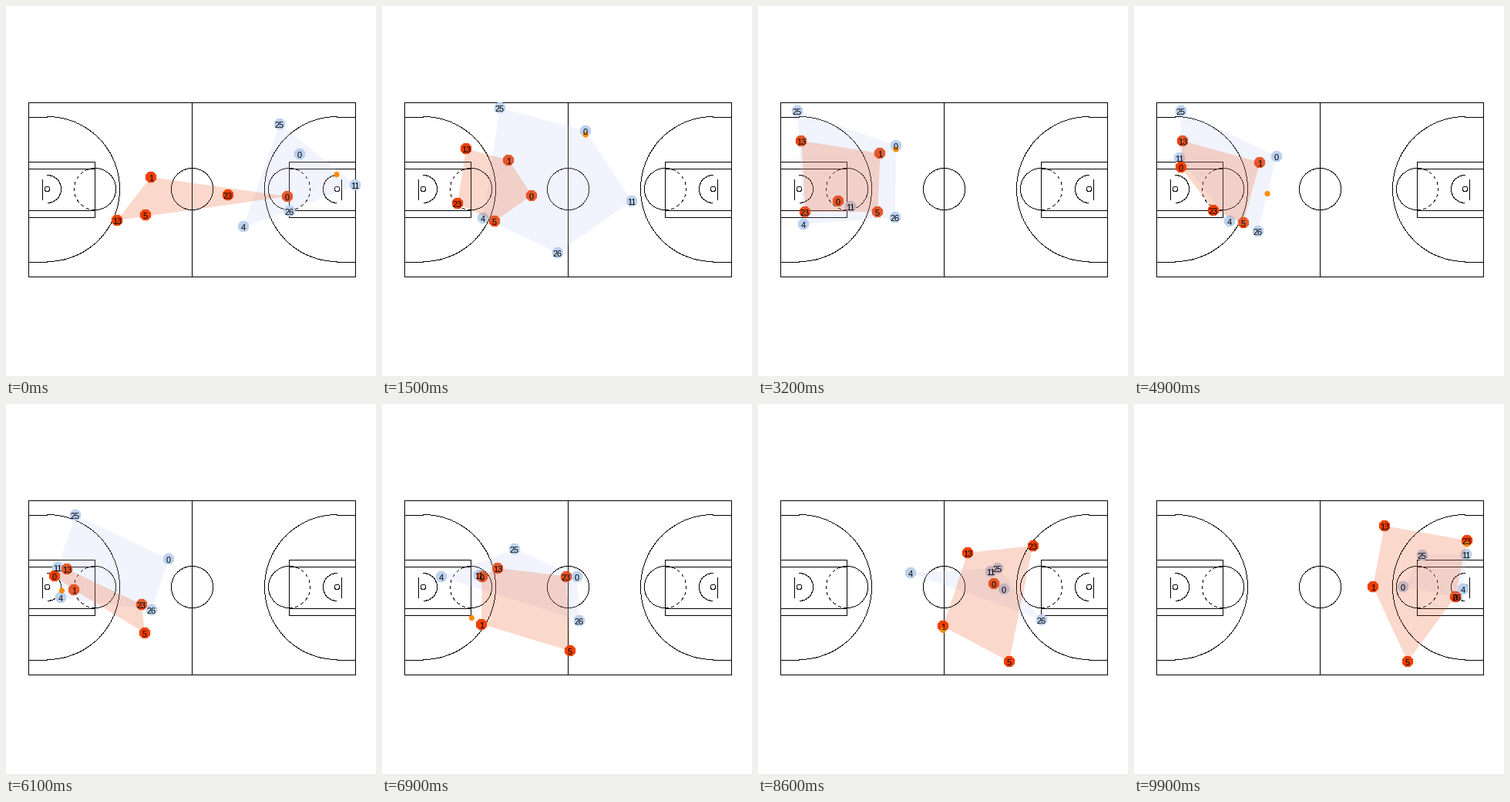
These frames come from a looping animation (480x480 px, 10 s). A matplotlib script:

```python
import numpy as np
import matplotlib.pyplot as plt
from matplotlib.animation import FuncAnimation
from matplotlib.patches import Circle, Polygon, RegularPolygon

SIZE, DPI, FRAMES = 480, 100, 100
PX = 72 / DPI
BLUE, ORANGE, BALL = "#bcd2ee", "#ee4000", "#ff8c00"
BLUE_AREA = "#bacbf4"
FT = 4.51                                   # pixels per foot
CX, CY = 241, 238
PAINT, RIM, FAR_RIM = map(np.array, ((65, CY), (53, CY), (429, CY)))
START, RETREAT, SET, SWING, SHOT, BREAK, END = 0, 15, 32, 49, 61, 76, 99


def mix(a, b, u):
    return np.asarray(a) * (1 - u) + np.asarray(b) * u


def glide(keys):
    """Monotone cubic path through {time: (x, y)}, one point per frame."""
    t = np.array(sorted(keys), float)
    p = np.array([keys[k] for k in sorted(keys)], float)
    h = np.diff(t)[:, None]
    d = np.diff(p, axis=0) / h
    same = d[:-1] * d[1:] > 0
    inner = np.where(same, 2 * d[:-1] * d[1:] / np.where(same, d[:-1] + d[1:], 1), 0)
    m = np.vstack([d[:1], inner, d[-1:]])
    f = np.arange(FRAMES)
    k = np.clip(np.searchsorted(t, f, side="right") - 1, 0, len(h) - 1)
    u = (f - t[k])[:, None] / h[k]
    return (mix(p[k], p[k + 1], u * u * (3 - 2 * u))
            + h[k] * u * (1 - u) * ((1 - u) * m[k] - u * m[k + 1]))


blue, orange = {}, {}


def matchup(man, guard, gap, attack, counter):
    """The guard drops back, then stays a share `gap` of the way to the paint."""
    runs = dict(zip((START, RETREAT, SET, SWING, SHOT, BREAK), attack))
    marks = dict(zip((START, SHOT, BREAK, END), counter))
    for t, share in ((RETREAT, 0.5), (SET, gap), (SWING, gap)):
        marks[t] = mix(runs[t], PAINT, share)
    blue[man], orange[guard] = runs, marks


matchup("25", "13", 0.38,
        [(355, 153), (153, 132), (51, 136), (61, 136), (90, 144), (253, 220)],
        [(144, 278), (79, 214), (222, 210), (325, 158)])
matchup("0", "1", 0.18,
        [(381, 192), (264, 162), (179, 181), (185, 195), (211, 201), (290, 241)],
        [(188, 222), (88, 241), (184, 310), (310, 237)])
matchup("11", "0", 0.3,
        [(453, 232), (324, 253), (120, 260), (59, 197), (67, 212), (205, 226)],
        [(365, 247), (63, 223), (217, 225), (417, 250)])
matchup("26", "5", 0.2,
        [(368, 266), (228, 320), (178, 274), (161, 292), (189, 267), (320, 292)],
        [(181, 271), (180, 297), (296, 334), (355, 334)])
matchup("4", "23", 0.35,
        [(308, 286), (131, 275), (59, 283), (124, 279), (71, 251), (91, 210)],
        [(288, 245), (176, 260), (294, 192), (432, 177)])

# On the counter-attack blue marks orange in the same way
for man, rival, share in (("25", "13", 0.47), ("0", "1", 0.33), ("11", "23", 0.3),
                          ("26", "5", 0.87), ("4", "0", 0.8)):
    blue[man][END] = mix(orange[rival][END], FAR_RIM, share)

blue = {num: glide(keys) for num, keys in blue.items()}
orange = {num: glide(keys) for num, keys in orange.items()}

# Who has the ball, and from when until when; it flies straight in between
hoop = np.tile(RIM, (FRAMES, 1))
HOLDS = [(blue["11"], -9, -2), (blue["0"], 4, 47), (blue["26"], 51, 55),
         (hoop, 62, 64), (orange["1"], 70, 90), (orange["23"], 96, FRAMES)]


def ball_at(f):
    for (who, _, end), (taker, start, _) in zip(HOLDS, HOLDS[1:]):
        if end < f < start:
            return mix(who[f], taker[f], (f - end) / (start - end))
    holder = next(who for who, start, end in HOLDS if start <= f <= end)
    return holder[f] + (0, 5)


def hull(points):
    pts = sorted(map(tuple, points))

    def chain(seq):
        out = []
        for x, y in seq:
            while len(out) > 1:
                (ax, ay), (bx, by) = out[-2:]
                if (bx - ax) * (y - ay) - (by - ay) * (x - ax) > 0:
                    break
                out.pop()
            out.append((x, y))
        return out[:-1]

    return chain(pts) + chain(pts[::-1])


fig = plt.figure(figsize=(SIZE / DPI, SIZE / DPI), dpi=DPI, facecolor="white")
ax = fig.add_axes([0, 0, 1, 1])
ax.set(xlim=(0, SIZE), ylim=(SIZE, 0))
ax.axis("off")


def line(x, y):
    ax.plot(x, y, color="black", lw=PX, antialiased=False, zorder=1,
            solid_capstyle="projecting", solid_joinstyle="miter")


def arc(cx, r, a, b, side=1, dashed=False):
    """One-pixel arc set dot by dot, with crisp edges."""
    s = np.arange(0, r * np.radians(b - a), 0.9)
    if dashed:
        s = s[s % 8 < 4]
    t = np.radians(a) + s / r
    ax.plot(np.round(cx + side * r * np.cos(t)), np.round(CY + r * np.sin(t)),
            ",", color="black", zorder=1)


def draw_court():
    left, right, top, bottom = CX - 212, CX + 212, CY - 113, CY + 113
    line([left, right, right, left, left], [top, top, bottom, bottom, top])
    line([CX, CX], [top, bottom])
    arc(CX, 6 * FT, 0, 360)
    for s in (1, -1):                       # left half, then its mirror
        base, key, rim, board = (CX - s * d for d in (212, 126, 188, 194))
        line([base, key, key, base], [CY - 36, CY - 36, CY + 36, CY + 36])
        for d in (-27, 27):
            line([base, key], [CY + d, CY + d])
        for d in (-94, 94):
            line([base, rim], [CY + d, CY + d])
        line([board, board], [CY - 13, CY + 13])
        arc(rim, 94, -90, 90, s)
        arc(rim, 4 * FT, -90, 90, s)
        arc(rim, 0.75 * FT, 0, 360)
        arc(key, 6 * FT, -90, 90, s)
        arc(key, 6 * FT, 90, 270, s, dashed=True)


draw_court()
players, areas = [], []
teams = (blue, BLUE, BLUE_AREA), (orange, ORANGE, ORANGE)
for z, (team, color, tint) in enumerate(teams):
    area = ax.add_patch(Polygon([(0, 0)] * 3, fc=tint, ec="none", alpha=0.2,
                                zorder=4 + z))
    areas.append((area, team))
    for num, path in team.items():
        dot = ax.add_patch(RegularPolygon((0, 0), 8, radius=7.7, fc=color, ec="none",
                                          orientation=np.pi / 8, zorder=2 + z))
        label = ax.text(0, 0, num, fontname="Liberation Sans", fontsize=11 * PX,
                        ha="center", va="baseline", zorder=8)
        players.append((dot, label, path))
ball = ax.add_patch(Circle((0, 0), 3.6, fc=BALL, ec="none", zorder=7))


def update(f):
    for dot, label, path in players:
        x, y = np.round(path[f])
        dot.xy = x, y
        label.set_position((x, y + 5))
    for area, team in areas:
        area.set_xy(hull([path[f] for path in team.values()]))
    ball.center = tuple(ball_at(f))
    return []


anim = FuncAnimation(fig, update, frames=FRAMES, interval=100, repeat=True,
                     repeat_delay=0, blit=False)
plt.show()
```
